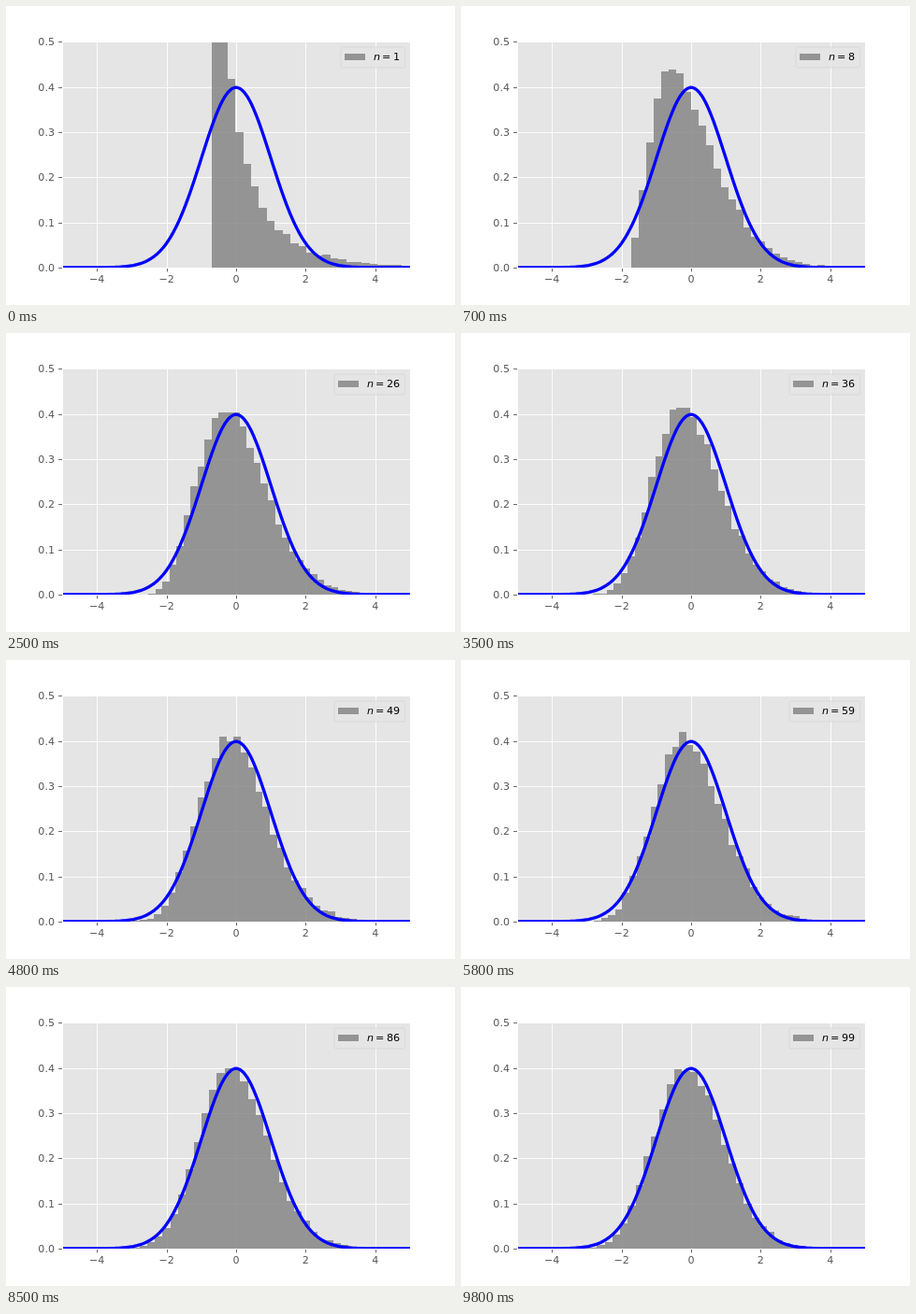
Write an HTML page that moves like this. It is 480x320 px and loops after 9.9 s.

```html
<!DOCTYPE html>
<html lang="en">
<head>
<meta charset="utf-8">
<title>Central limit theorem</title>
<style>
  html, body { margin: 0; width: 100%; height: 100%; overflow: hidden; background: #fff; }
  svg { display: block; font: 11.11px "DejaVu Sans", sans-serif; }
</style>
</head>
<body>
<svg width="480" height="320" viewBox="0 0 480 320">
  <clipPath id="area"><rect x="60" y="38.4" width="372" height="241.6"/></clipPath>
  <rect x="60" y="38" width="372" height="242" fill="#e5e5e5"/>
  <path id="grid" fill="none" stroke="#fff" stroke-width=".89"/>
  <path id="ticks" fill="none" stroke="#555" stroke-width=".89"/>
  <g clip-path="url(#area)">
    <path id="bars" fill="#808080" fill-opacity=".8" shape-rendering="crispEdges"/>
    <path id="bell" fill="none" stroke="#00f" stroke-width="3.33" stroke-linejoin="round"/>
  </g>
  <path d="M60.5 38V281M432.5 38V281M60 38.5H433M60 280.5H433" fill="none" stroke="#fff" stroke-width="1.11"/>
  <g id="labels" fill="#555"></g>
  <rect id="box" y="44" height="22" rx="2.2" fill="#e5e5e5" stroke="#ccc" stroke-width=".56" opacity=".8"/>
  <rect id="swatch" y="51" width="22" height="7" fill="#808080" fill-opacity=".8" shape-rendering="crispEdges"/>
  <text y="58"><tspan id="letter" font-style="italic">n</tspan><tspan id="equals">=</tspan><tspan id="count"></tspan></text>
</svg>
<script>
const STEP = 100, LAST = 99, SAMPLES = 20000, BINS = 40;
const UNIT = 37.2, MID = 246, BASE = 280, TALL = 483.2;
const $ = id => document.getElementById(id);
const px = x => MID + x * UNIT;
const py = y => BASE - y * TALL;
const snap = v => Math.floor(v + 0.5) + 0.5;

// how the bins drift: [n, first edge px, bin width px]
const drift = [
  [1, 219.7, 8.46], [16, 157.6, 7.67], [36, 133.8, 7.41], [49, 135.1, 7.73],
  [69, 133.7, 7.48], [86, 134.3, 8.28], [99, 128.9, 8.26]
];

function binsFor(n) {
  const i = Math.max(1, drift.findIndex(p => p[0] >= n));
  const [n0, left0, width0] = drift[i - 1], [n1, left1, width1] = drift[i];
  const f = (Math.sqrt(n) - Math.sqrt(n0)) / (Math.sqrt(n1) - Math.sqrt(n0));
  return [left0 + (left1 - left0) * f, width0 + (width1 - width0) * f];
}

function logGamma(a) {
  const half = a % 1 > 0;
  let sum = half ? Math.log(Math.PI) / 2 : 0;
  for (let k = half ? 0.5 : 1; k < a; k++) sum += Math.log(k);
  return sum;
}

// density of a standardised chi-square sum of n terms
function density(n, x) {
  const v = n + Math.sqrt(2 * n) * x, h = n / 2;
  if (v <= 0) return 0;
  return Math.sqrt(2 * n) * Math.exp((h - 1) * Math.log(v) - v / 2 - h * Math.LN2 - logGamma(h));
}

function random(seed) {
  let s = seed >>> 0;
  return () => {
    s = (s + 0x6D2B79F5) >>> 0;
    let r = Math.imul(s ^ s >>> 15, 1 | s);
    r = r + Math.imul(r ^ r >>> 7, 61 | r) ^ r;
    return ((r ^ r >>> 14) >>> 0) / 4294967296;
  };
}

// expected count per bin plus sampling noise
function histogram(n) {
  const [left, width] = binsFor(n);
  const rnd = random(n * 7919);
  const scale = SAMPLES * width / UNIT;
  const edge = k => Math.round(left + k * width);
  let d = "";
  for (let k = 0; k < BINS; k++) {
    const mean = density(n, (left + (k + 0.5) * width - MID) / UNIT) * scale;
    const noise = Math.sqrt(-2 * Math.log(1 - rnd())) * Math.cos(2 * Math.PI * rnd());
    const tally = Math.max(0, Math.round(mean + noise * Math.sqrt(mean)));
    const top = Math.round(py(Math.min(tally / scale, 0.6)));
    if (top < BASE) d += `M${edge(k)} ${BASE}V${top}H${edge(k + 1)}V${BASE}z`;
  }
  return d;
}

function drawAxes() {
  let grid = "", ticks = "", labels = "";
  for (let x = -4; x <= 4; x += 2) {
    const p = snap(px(x));
    grid += `M${p} 38V280`;
    ticks += `M${p} 280V284.4`;
    labels += `<text x="${px(x)}" y="296" text-anchor="middle">${String(x).replace("-", "\u2212")}</text>`;
  }
  for (let i = 0; i <= 5; i++) {
    const y = py(i / 10), p = snap(y);
    grid += `M60 ${p}H432`;
    ticks += `M60 ${p}H56.1`;
    labels += `<text x="52" y="${Math.round(y + 4)}" text-anchor="end">0.${i}</text>`;
  }
  $("grid").setAttribute("d", grid);
  $("ticks").setAttribute("d", ticks);
  $("labels").innerHTML = labels;

  let bell = "";
  for (let i = -100; i <= 100; i++) {
    const x = i / 20, y = Math.exp(-x * x / 2) / Math.sqrt(2 * Math.PI);
    bell += `${bell ? "L" : "M"}${px(x).toFixed(2)} ${py(y).toFixed(2)}`;
  }
  $("bell").setAttribute("d", bell);
}

function drawLegend(n) {
  const shift = n < 10 ? 7 : 0;
  const place = (id, x) => $(id).setAttribute("x", x + shift);
  place("box", 350.9);
  $("box").setAttribute("width", 75.6 - shift);
  place("swatch", 355);
  place("letter", 386);
  place("equals", 395);
  place("count", 407);
  $("count").textContent = n;
}

const shapes = Array.from({ length: LAST }, (_, i) => histogram(i + 1));
let shown = 0;

function frame(now) {
  const n = Math.floor(now / STEP) % LAST + 1;
  if (n !== shown) {
    shown = n;
    $("bars").setAttribute("d", shapes[n - 1]);
    drawLegend(n);
  }
  requestAnimationFrame(frame);
}

drawAxes();
frame(0);
</script>
</body>
</html>
```
